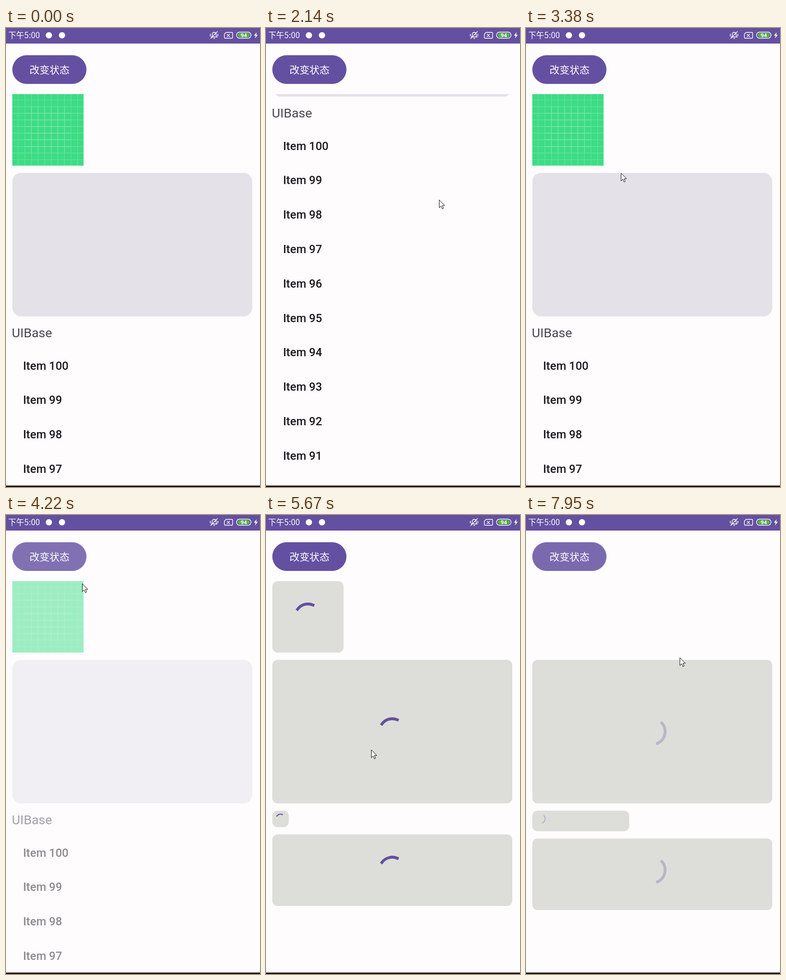
These frames come from a looping animation (524x944 px, 8000 ms). An HTML page with a canvas:

```html
<!DOCTYPE html>
<html lang="zh">
<head>
<meta charset="utf-8">
<style>
  html, body { margin: 0; width: 100%; height: 100%; overflow: hidden; background: #fffcfe; }
  canvas { display: block; width: 524px; height: 944px; }
</style>
</head>
<body>
<canvas id="stage"></canvas>
<script>
const W = 524, H = 944, LOOP = 8000;
const PURPLE = '#6450a0', PAGE = '#fffcfe', SKELETON = '#dddeda';
const CJK = '"Noto Sans CJK SC", "Noto Sans CJK", sans-serif';
const FIRST_TAP = 4070, SECOND_TAP = 7740, SKELETON_IN = 4800;
const LEFT = 13, WIDE = 495;

const canvas = document.getElementById('stage');
const ctx = canvas.getContext('2d');
const dpr = window.devicePixelRatio || 1;
canvas.width = W * dpr;
canvas.height = H * dpr;

const clamp = v => Math.min(1, Math.max(0, v));
const ramp = (t, from, duration) => clamp((t - from) / duration);
const mix = (a, b, p) => a + (b - a) * p;
const easeOut = p => 1 - (1 - p) ** 3;

// The pointer glides between a few stops.
const STOPS = [
  { t: 130, x: 462, y: 896 }, { t: 900, x: 226, y: 361 },
  { t: 1250, x: 115, y: 128 }, { t: 1800, x: 362, y: 656 },
  { t: 2140, x: 357, y: 353 }, { t: 2640, x: 313, y: 423 },
  { t: 3112, x: 276, y: 875 }, { t: 3450, x: 175, y: 150 },
  { t: FIRST_TAP, x: 128, y: 90 }, { t: 4220, x: 157, y: 141 },
  { t: 4830, x: 150, y: 85 }, { t: 5670, x: 217, y: 483 },
  { t: 6700, x: 107, y: 109 }, { t: SECOND_TAP, x: 107, y: 86 },
  { t: 7950, x: 317, y: 293 }
];

function pointerAt(t) {
  const i = STOPS.findIndex(stop => stop.t > t);
  if (i < 1) return i < 0 ? STOPS[STOPS.length - 1] : STOPS[0];
  const a = STOPS[i - 1], b = STOPS[i], p = (t - a.t) / (b.t - a.t);
  return { x: mix(a.x, b.x, p), y: mix(a.y, b.y, p) };
}

// Flung up, then dragged back down.
const scrollAt = t => 452 * easeOut(ramp(t, 1800, 320)) * (1 - ramp(t, 2640, 472));

const rippleAt = (t, tap) => 0.19 * Math.min(ramp(t, tap, 70), 1 - ramp(t, tap + 160, 220));

// cubic-bezier(.4, 0, .2, 1), solved by bisection
function standardEase(x) {
  x = clamp(x);
  let lo = 0, hi = 1;
  for (let i = 0; i < 18; i++) {
    const s = (lo + hi) / 2, r = 1 - s;
    if (1.2 * s * r * r + 0.6 * s * s * r + s ** 3 < x) lo = s; else hi = s;
  }
  return 3 * lo * lo - 2 * lo ** 3;
}

function box(x, y, w, h, r, fill) {
  ctx.beginPath();
  ctx.roundRect(x, y, w, h, r);
  ctx.fillStyle = fill;
  ctx.fill();
}

function text(str, x, y, font, fill, align = 'left') {
  ctx.font = font;
  ctx.fillStyle = fill;
  ctx.textAlign = align;
  ctx.fillText(str, x, y);
}

function path(d, { fill, stroke, width = 1.4 }) {
  const p = new Path2D(d);
  if (fill) { ctx.fillStyle = fill; ctx.fill(p); }
  if (stroke) { ctx.strokeStyle = stroke; ctx.lineWidth = width; ctx.stroke(p); }
}

function statusBar() {
  ctx.fillStyle = PURPLE;
  ctx.fillRect(0, 0, W, 32);
  text('下午5:00', 4.5, 21, '500 16.6px ' + CJK, '#fff');
  for (const x of [88.5, 115.5]) box(x - 6.5, 8.5, 13, 13, 6.5, '#fff');

  const line = { stroke: '#fff' };
  path('M424 18.5 q1.5-1.5 1.5-5 q0-4.5 4-4.5 q4 0 4 4.5 q0 3.5 1.5 5 Z M428 21.5 h3 M436.5 7 L422 22 M421.5 12 v5 M437 12 v5', line);
  path('M454 9 H466 Q467.5 9 467.5 10.5 V19.5 Q467.5 21 466 21 H452 Q450.5 21 450.5 19.5 V12.5 Z M456 12.5 l5.5 5.5 M461.5 12.5 l-5.5 5.5', line);
  ctx.beginPath();
  ctx.roundRect(475.5, 8.5, 30, 12.5, 6.2);
  ctx.stroke();
  box(478, 10.5, 25, 8.5, 4.2, '#50b83c');
  text('94', 490.5, 19, '700 11.5px Roboto, sans-serif', '#fff', 'center');
  path('M517 8.5 L511.5 15.8 H515 L513.8 21.5 L519.5 13.7 H516 Z', { fill: '#fff' });
}

function button(ripple) {
  box(LEFT, 56, 153, 59, 29.5, PURPLE);
  box(LEFT, 56, 153, 59, 29.5, `rgba(255,255,255,${ripple})`);
  text('改变状态', 89.8, 93.5, '500 20.6px ' + CJK, '#fff', 'center');
}

function gridPicture(x, y, size) {
  const unit = size / 108;
  ctx.fillStyle = '#3ddc84';
  ctx.fillRect(x, y, size, size);
  ctx.strokeStyle = 'rgba(255,255,255,.2)';
  ctx.lineWidth = 1.2;
  const lines = (first, last, from, to) => {
    ctx.beginPath();
    for (let at = first; at <= last; at += 10) {
      ctx.moveTo(x + at * unit, y + from * unit);
      ctx.lineTo(x + at * unit, y + to * unit);
      ctx.moveTo(x + from * unit, y + at * unit);
      ctx.lineTo(x + to * unit, y + at * unit);
    }
    ctx.stroke();
  };
  lines(9, 99, 0, 108);
  lines(29, 79, 19, 89);
}

function content(scroll, alpha) {
  ctx.save();
  ctx.beginPath();
  ctx.rect(0, 136, W, 787);
  ctx.clip();
  ctx.translate(0, -scroll);
  ctx.globalAlpha = alpha;
  gridPicture(LEFT, 136, 147);
  box(LEFT, 298, WIDE, 295, 18, '#e4e1e8');
  text('UIBase', 12, 636, '400 26.5px Roboto, sans-serif', '#49454f');
  for (let i = 0; i < 11; i++) {
    text('Item ' + (100 - i), 35.2, 702.6 + i * 70.8, '500 23.6px Roboto, sans-serif', '#1c1b1f');
  }
  ctx.restore();
}

function spinner(x, y, age, scale = 1) {
  const turns = age / 1400, phase = turns % 1;
  const head = 290 * standardEase(phase * 2);
  const tail = 290 * standardEase(phase * 2 - 1);
  const base = -92 + 0.239 * age + 290 * Math.floor(turns);
  const rad = a => a * Math.PI / 180;
  ctx.beginPath();
  ctx.arc(x, y, 26.5 * scale, rad(base + tail), rad(base + Math.max(head, tail + 0.1)));
  ctx.strokeStyle = PURPLE;
  ctx.lineWidth = 5.9 * scale;
  ctx.lineCap = 'square';
  ctx.stroke();
  ctx.lineCap = 'butt';
}

function skeleton(age, { picture, labelWidth, labelHeight, alpha, spinnerAlpha }) {
  const card = (y, w, h) => box(LEFT, y, w, h, 11, SKELETON);
  ctx.save();
  ctx.globalAlpha = alpha;
  if (picture) card(136, 147, 147);
  card(298, WIDE, 295);
  card(608, labelWidth, labelHeight);
  card(608 + labelHeight + 14.8, WIDE, 147.3);

  ctx.globalAlpha = spinnerAlpha;
  if (picture) spinner(86.5, 209.5, age);
  spinner(260.5, 445.5, age);
  spinner(30, 624.8, age, 0.36);
  spinner(260.5, 730.3, age);
  ctx.restore();
}

function pointer({ x, y }) {
  ctx.save();
  ctx.translate(x + 0.5, y + 0.5);
  path('M0 0 V16 L3.7 12.5 L6.3 18.3 L8.8 17.2 L6.3 11.5 H11.3 Z', { fill: '#fff', stroke: '#111', width: 1 });
  ctx.restore();
}

function draw(t) {
  ctx.setTransform(dpr, 0, 0, dpr, 0, 0);
  ctx.fillStyle = PAGE;
  ctx.fillRect(0, 0, W, H);

  if (t < SKELETON_IN) {
    content(scrollAt(t), 1 - ramp(t, FIRST_TAP + 20, 260));
  } else if (t < SECOND_TAP) {
    const alpha = ramp(t, SKELETON_IN, 280);
    skeleton(t - FIRST_TAP - 18, { picture: true, labelWidth: 34, labelHeight: 34, alpha, spinnerAlpha: alpha });
  } else {
    const age = t - SECOND_TAP;
    skeleton(age, { picture: false, labelWidth: 200, labelHeight: 42.5, alpha: 1, spinnerAlpha: age / 730 });
  }

  statusBar();
  button(Math.max(rippleAt(t, FIRST_TAP), rippleAt(t, SECOND_TAP)));
  ctx.fillStyle = '#1c1b1f';
  ctx.fillRect(0, 941, W, 3);
  if (t >= STOPS[0].t) pointer(pointerAt(t));
}

const start = performance.now();
function tick() {
  draw((performance.now() - start) % LOOP);
  requestAnimationFrame(tick);
}
tick();
</script>
</body>
</html>
```
